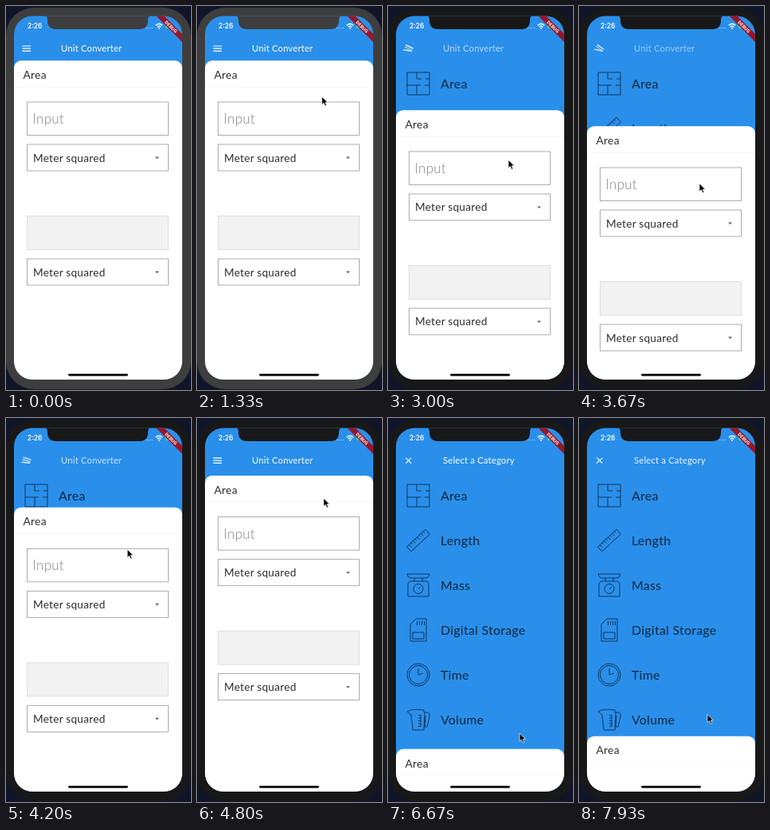
These frames come from a looping animation (232x480 px, 8000 ms). An HTML page:

```html
<!DOCTYPE html>
<html lang="en">
<head>
<meta charset="utf-8">
<title>Unit Converter</title>
<style>
html, body { margin: 0; width: 232px; height: 480px; overflow: hidden; background: #10152a; }
svg { display: block; }
text { font-family: Lato, "Open Sans", sans-serif; letter-spacing: .02em; fill: #2c2c2c; }
.title { font-size: 11.2px; fill: #fff; }
.name { font-size: 15.8px; fill: #12263c; }
.choice { font-size: 13.6px; }
.icon { fill: none; stroke: #0c2038; stroke-width: .8; stroke-linejoin: round; }
.box { fill: #fff; stroke: #a4a4a4; stroke-width: .9; }
#menu { stroke: #fff; stroke-width: 1.2; }
</style>
</head>
<body>
<svg width="232" height="480" viewBox="0 0 232 480">
  <defs>
    <clipPath id="screen"><rect x="10" y="12.5" width="211" height="454.5" rx="23"/></clipPath>
    <clipPath id="safe"><rect x="10" y="12" width="211" height="436"/></clipPath>
  </defs>
  <g id="bezel">
    <rect y="2" width="232" height="477" rx="35"/>
    <g clip-path="url(#screen)">
      <rect x="10" y="12" width="211" height="455" fill="#2a8fea"/>
      <g id="menu">
        <path id="top" d="M-5.3 0H5.3"/><path id="mid" d="M-5.3 0H5.3"/><path id="low" d="M-5.3 0H5.3"/>
      </g>
      <text id="closed" class="title" x="69" y="57">Unit Converter</text>
      <text id="opened" class="title" x="69" y="57">Select a Category</text>
      <g id="list"></g>
      <rect id="sheet" x="10" y="68.3" width="211" height="440" rx="9" fill="#fff"/>
      <g clip-path="url(#safe)"><g id="form">
        <text x="21.5" y="91" font-size="13.8">Area</text>
        <path d="M10 101.5H221" stroke="#f8f8f8"/>
        <rect class="box" x="26.5" y="120" width="177" height="41.5"/>
        <text x="33.5" y="147" style="font-size:16.8px;font-weight:300;fill:#808080">Input</text>
        <rect x="26.5" y="262.5" width="177" height="42" fill="#f2f2f2" stroke="#dcdcdc" stroke-width=".9"/>
      </g></g>
      <rect x="78" y="459.7" width="75" height="2.8" rx="1.4" fill="#000"/>
      <path d="M46 11H184Q178 11 178 18Q178 29 167 29H63Q52 29 52 18Q52 11 46 11Z"/>
      <text x="27" y="28.3" style="font:600 8.3px Inter,sans-serif;letter-spacing:0;fill:#fff">2:26</text>
      <path d="M175 27.5h9" stroke="#a9d2f7" stroke-dasharray="1.2 1.4"/>
      <g fill="none" stroke="#fff" stroke-width="1.3">
        <path d="M187.8 24.2q4.2-4 8.4 0M189.7 26.3q2.3-2 4.6 0"/><circle cx="192" cy="28" r=".3"/>
      </g>
      <rect x="200" y="22.5" width="10" height="5.6" rx="1.5" fill="#4cd964"/>
      <g transform="translate(207 26) rotate(45)">
        <rect x="-30" y="-3.6" width="60" height="7.2" fill="#95172a"/>
        <text y="2.1" text-anchor="middle" style="font:bold 5.8px Roboto,sans-serif;fill:#fff">DEBUG</text>
      </g>
    </g>
  </g>
  <path id="cursor" d="M0 0V10.2L2.4 8L4 11.8L5.8 11L4.2 7.4H7.4Z" stroke="#fff" stroke-width=".7"/>
</svg>
<script>
const $ = id => document.getElementById(id);
const set = (id, name, value) => $(id).setAttribute(name, value);
const ticks = (count, step, draw) => Array.from({ length: count }, (_, i) => draw((i - (count - 1) / 2) * step, i)).join('');

// Category icons, drawn around their centres
const categories = {
  Area: '<path d="M-14-14H14V14H-14ZM-2-14V-6H4M14-6H9M-14 2H-2V14M-2 2H3M8 2H14"/>',
  Length: `<path transform="rotate(-43)" d="M-16-4H16V4H-16Z${ticks(8, 3.5, (x, i) => `M${x}-4v${i % 2 ? 2.5 : 4}`)}"/>`,
  Mass: '<path d="M-14-14H14Q13-9 10-9H-10Q-13-9-14-14ZM-5-9V-5M5-9V-5M-9-5H9Q13-5 13 0V14H-13V0Q-13-5-9-5ZM0 5L3 2"/><circle cy="4.5" r="6"/>',
  'Digital Storage': `<path d="M-3-14H10V14H-10V-7ZM-7 3H7V11H-7Z${ticks(4, 3, x => `M${x + 3}-11v5`)}"/>`,
  Time: '<circle r="14"/><circle r="11.5"/><path d="M0-8V0L6-2"/>',
  Volume: `<path d="M-14-10Q-8-14 7-12V-9H11Q15-9 14-4L11 9H8L9-5M-14-10L-9-6L-7 13H7L8-9M3-6V9${ticks(5, 3.5, y => `M0 ${y + 1.5}h3`)}"/>`
};
$('list').innerHTML = Object.entries(categories).map(([name, art], i) =>
  `<g transform="translate(38 ${97 + 56 * i})"><g class="icon">${art}</g><text class="name" x="28" y="5.5">${name}</text></g>`
).join('');
$('form').innerHTML += [173, 316].map(y =>
  `<rect class="box" x="26.5" y="${y}" width="177" height="33"/>
   <text class="choice" x="34" y="${y + 21.5}">Meter squared</text>
   <path d="M187 ${y + 15.5}h5l-2.5 2.7z" fill="#666"/>`
).join('');

const travel = 345.5;

function draw(t) {
  const ease = (from, to) => {
    const u = Math.min(1, Math.max(0, (t - from) / (to - from)));
    return u * u * (3 - 2 * u);
  };
  // A short pull down and back, a fling open, then a pull towards closing
  const pull = 91 * (ease(2260, 3450) - ease(3350, 5000)) - 18.5 * ease(7350, 8100);
  const y = pull + travel * ease(5525, 6200);
  const open = y / travel, turn = Math.min(1, open * 3.2), gap = 3.2 * (1 - open);
  const arrive = 1 - ease(930, 1700);
  const mouseX = 151 + 12 * arrive + 16 * ease(3900, 5730) - 2 * ease(5730, 6500) - 4 * ease(7330, 7930);
  const mouseY = 102 + 24 * arrive + 1.46 * pull - 7 * ease(4000, 4800) + 299 * ease(5400, 6100);

  set('bezel', 'fill', t < 1870 ? '#3e3e3e' : '#181818');
  set('sheet', 'transform', `translate(0 ${y})`);
  set('form', 'transform', `translate(0 ${y})`);
  set('closed', 'opacity', Math.max(0, 1 - 2 * open));
  set('opened', 'opacity', Math.max(0, 2 * open - 1));
  set('menu', 'transform', `translate(25.7 53.2) rotate(${45 * turn}) scale(${1 - .1 * open})`);
  set('top', 'transform', `translate(0 ${-gap})`);
  set('mid', 'opacity', Math.max(0, 1 - 2 * open));
  set('low', 'transform', `translate(0 ${gap}) rotate(${-90 * open})`);
  set('cursor', 'visibility', t < 930 ? 'hidden' : 'visible');
  set('cursor', 'transform', `translate(${mouseX} ${mouseY})`);
}

const start = performance.now();
function loop() {
  draw((performance.now() - start) % 8000);
  requestAnimationFrame(loop);
}
loop();
</script>
</body>
</html>
```
